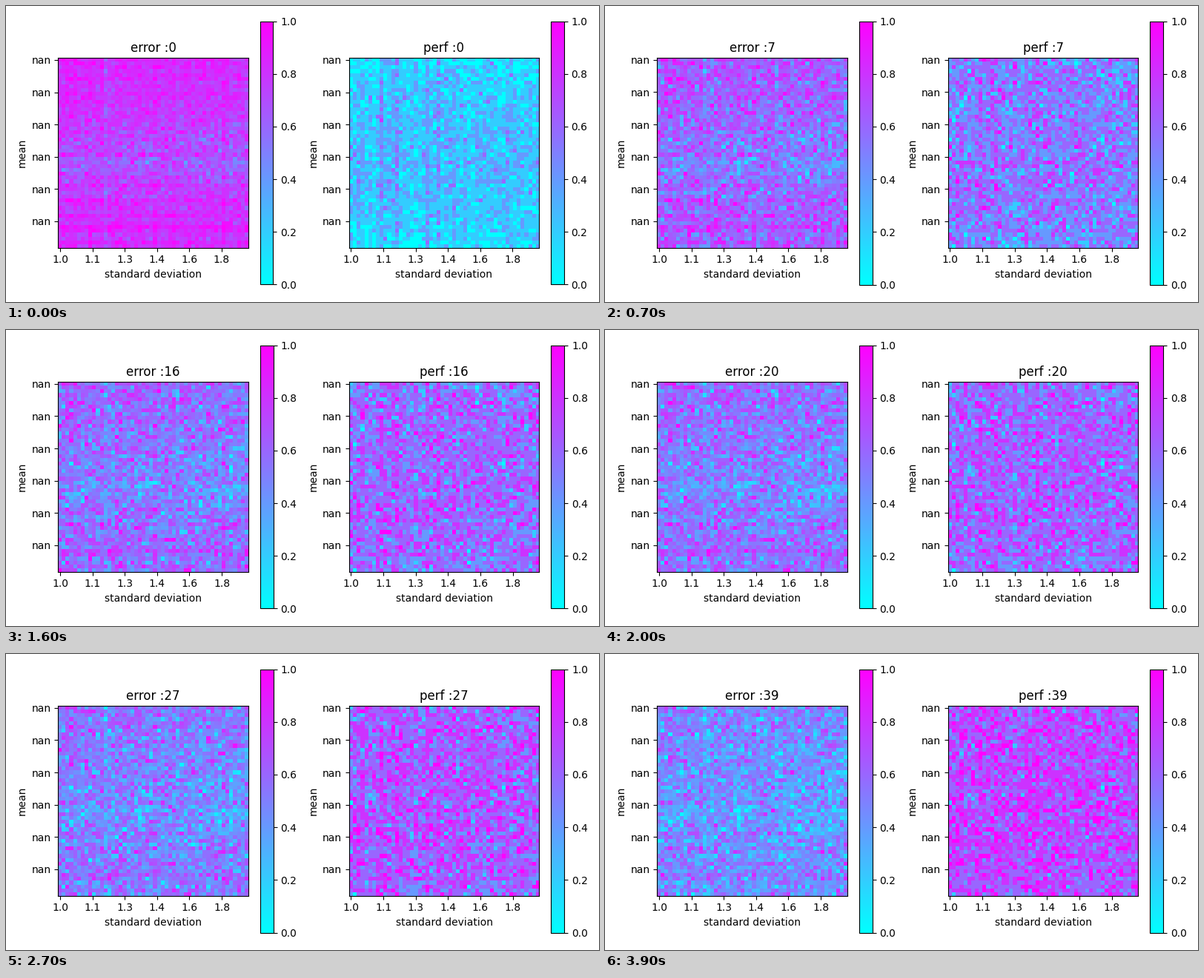
A matplotlib script for the animation above (4 s loop, 800 by 400 pixels).

```python
import numpy as np
import matplotlib.pyplot as plt
from matplotlib.animation import FuncAnimation

FRAMES, STEP = 40, 100
N = 50
TICKS = 8.5 * np.arange(6)
SPREADS = ["1.0", "1.1", "1.3", "1.4", "1.6", "1.8"]

rng = np.random.default_rng(12)
row, col = np.mgrid[0:N, 0:N]


def drifting_noise(keep=0.93, fixed=0.8):
    """Unit noise per cell: a lasting part plus a slow random walk."""
    still = rng.normal(size=(N, N))
    walk = rng.normal(size=(N, N))
    out = []
    for _ in range(FRAMES):
        out.append(fixed * still + np.sqrt(1 - fixed**2) * walk)
        walk = keep * walk + np.sqrt(1 - keep**2) * rng.normal(size=(N, N))
    return out


def stripes(sd, marked, lift):
    """Lasting offsets of rows or columns, some of them standing out."""
    offsets = rng.normal(0, sd, N)
    offsets[marked] += lift
    return offsets


def rise(i):
    """Fast early learning that levels off."""
    return 1 - np.exp(-i / 2.7)


error_noise, perf_noise = drifting_noise(), drifting_noise()
error_stripes = (stripes(0.025, [33, 44], 0.11)[:, None]
                 + stripes(0.02, [12], -0.1))
perf_stripes = stripes(0.03, [8, 12, 20, 23, 41], 0.15)
dip = np.exp(-((row - 25) / 10) ** 2)
edge = ((row - 24.5) / 25) ** 2


def error_field(i):
    level = 0.83 - 0.16 * rise(i) - 0.0052 * i
    depth = 0.15 - 0.002 * i + 0.04 * (col / N - 0.5)
    sd = 0.07 + 0.09 * rise(i) + 0.04 * dip * (1 - rise(i))
    return np.clip(level - depth * dip + error_stripes
                   + sd * error_noise[i], 0, 1)


def perf_field(i):
    level = 0.27 + 0.24 * rise(i) + 0.0055 * i
    fade = 1 - 0.6 * rise(i)
    sd = 0.13 + 0.045 * rise(i)
    value = level + fade * (perf_stripes - 0.14 * edge) + sd * perf_noise[i]
    return np.clip(np.round(value * 5) / 5, 0, 1)


fig, axes = plt.subplots(1, 2, figsize=(8, 4), dpi=100, facecolor="white")


class Panel:
    def __init__(self, ax, name, field):
        self.ax, self.name, self.field = ax, name, field
        self.im = ax.imshow(field(0), cmap="cool", vmin=0, vmax=1,
                            interpolation="nearest")
        ax.set_xticks(TICKS, SPREADS)
        ax.set_yticks(TICKS, ["nan"] * len(TICKS))
        ax.set_xlabel("standard deviation")
        ax.set_ylabel("mean")
        fig.colorbar(self.im, ax=ax)

    def show(self, i):
        self.im.set_data(self.field(i))
        self.ax.set_title(f"{self.name} :{i}")


panels = [Panel(axes[0], "error", error_field),
          Panel(axes[1], "perf", perf_field)]


def update(i):
    for panel in panels:
        panel.show(i)
    fig.tight_layout()
    return []


def reset():
    fig.subplots_adjust(left=0.125, right=0.9, bottom=0.11, top=0.88,
                        wspace=0.2)
    return update(0)


anim = FuncAnimation(fig, update, frames=FRAMES, interval=STEP,
                     init_func=reset, repeat=True, repeat_delay=0)
plt.show()
```
